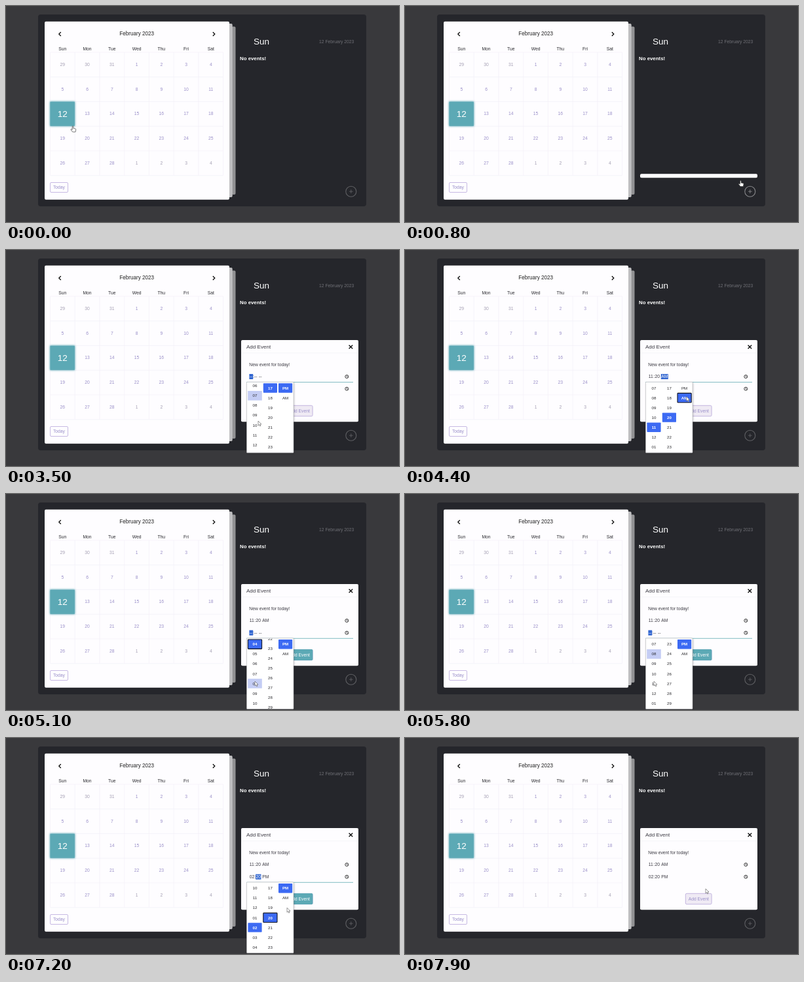
Write an HTML page that moves like this. It is 600 px wide and 331 px high and loops after 8 s.

```html
<!DOCTYPE html>
<html lang="en">
<head>
<meta charset="utf-8">
<title>Calendar: add event</title>
<style>
  html, body { margin: 0; width: 100%; height: 100%; overflow: hidden; background: #39393c; }
  svg { display: block; width: 100%; height: 100%; }
  text { font-family: "Liberation Sans", Arial, sans-serif; white-space: pre; }
</style>
</head>
<body>
<svg viewBox="0 0 600 331" preserveAspectRatio="none">
  <defs>
    <filter id="glow" x="-20%" y="-20%" width="140%" height="140%"><feGaussianBlur stdDeviation="1.7"/></filter>
  </defs>
  <g id="base"></g>
  <g id="live"></g>
</svg>
<script>
const LOOP = 8000, STEP = 100;
const TEAL = '#5ca9b5', PURPLE = '#9a90c9', INK = '#3b3a42', BLUE = '#3c6af3';
const CELL = 37.75, ROW = 15.05, COLUMNS = [380, 403.4, 426.6];
const MESSAGE = 'New event for today!';

// Drawing helpers; text is placed by its vertical centre.
const text = (s, x, y, size, fill, anchor = 'middle', extra = '') =>
  `<text x="${x}" y="${y + size * 0.35}" font-size="${size}" fill="${fill}" text-anchor="${anchor}" ${extra}>${s}</text>`;
const rect = (x, y, w, h, fill, r = 0, extra = '') =>
  `<rect x="${x}" y="${y}" width="${w}" height="${h}" rx="${r}" fill="${fill}" ${extra}/>`;
const path = (d, stroke, width, fill = 'none') =>
  `<path d="${d}" stroke="${stroke}" stroke-width="${width}" fill="${fill}" stroke-linejoin="round"/>`;

// Progress from 0 to 1 between two times.
const ramp = (t, from, to) => Math.min(1, Math.max(0, (t - from) / (to - from)));
const ease = (t, from, to) => { const p = ramp(t, from, to); return p * p * (3 - 2 * p); };

// Scroll gives each column's first item; picks are clicks: [time, column, item].
const PICKERS = [
  { open: 3100, close: 4600, top: 202.3, fieldY: 194,
    scroll: t => [4 + 3 * ease(t, 3300, 3600), 17, 0],
    picks: [[3700, 0, 11], [4100, 1, 20], [4300, 2, 1]] },
  { open: 4900, close: 7300, top: 221, fieldY: 212.7,
    scroll: t => [4 + 6 * ease(t, 5500, 6100), 17 + 6 * (ease(t, 4900, 5140) - ease(t, 6600, 6900)), 0],
    picks: [[6200, 0, 14], [7000, 1, 20]] }
];
const NAMES = [n => pad((n - 1) % 12 + 1), pad, n => ['PM', 'AM'][n]];
function pad(n) { return String(n).padStart(2, '0'); }

const rowY = (p, item, offset) => p.top + 9.2 + (item - offset) * ROW;
const pickStop = p => ([time, col, item]) =>
  [time - 100, COLUMNS[col] + 3, rowY(p, item, p.scroll(time)[col]) - 2];

// Pointer stops: [arrival time, x, y].
const STOPS = [
  [0, 102, 184], [600, 526, 281], [1200, 418, 175],
  [3000, 519, 194], [3400, 385, 262], [4600, 455, 245],
  [4800, 519, 212], [5100, 380, 287], [6600, 406, 274],
  [7300, 455, 245], [7900, 459, 231],
  ...PICKERS.flatMap(p => p.picks.map(pickStop(p)))
].sort((a, b) => a[0] - b[0]);

// Each move ends at its stop and lasts in proportion to its length.
function pointerAt(t) {
  const i = STOPS.findIndex(([time]) => time > t);
  if (i < 0) return STOPS[STOPS.length - 1].slice(1);
  const [t0, x0, y0] = STOPS[i - 1], [t1, x1, y1] = STOPS[i];
  const duration = 3.4 * Math.hypot(x1 - x0, y1 - y0);
  const e = ease(t, Math.max(t0, t1 - duration), t1);
  return [x0 + (x1 - x0) * e, y0 + (y1 - y0) * e];
}

function drawBase() {
  let s = rect(49, 13, 501, 294, '#25262b', 4)
    + rect(344, 31.5, 6.5, 257.5, '#929294', 2)
    + rect(339, 27, 6.7, 266, '#bfbfc1', 2)
    + rect(59, 23.7, 282, 273, '#fefdff', 2)
    + path('M83.8 40l-3 3 3 3M315.8 40l3 3-3 3', '#111', 1.3)
    + text('February 2023', 199.7, 42, 8.15, '#222');
  let grid = '';
  for (let c = 0; c <= 7; c++) grid += `M${67.4 + c * CELL} 71v188.5`;
  for (let r = 0; r <= 5; r++) grid += `M67.4 ${71 + r * CELL}h${7 * CELL}`;
  s += path(grid, '#f3f0f8', 0.7);
  ['Sun', 'Mon', 'Tue', 'Wed', 'Thu', 'Fri', 'Sat'].forEach((name, c) => {
    s += text(name, 86.3 + c * CELL, 65.6, 6.75, '#2b2b30');
  });
  for (let i = 0; i < 35; i++) {
    const x = 86.3 + i % 7 * CELL, y = 89.6 + Math.floor(i / 7) * CELL;
    const date = new Date(2023, 0, 29 + i), day = date.getDate();
    const current = date.getMonth() === 1;
    if (current && day === 12) {
      s += rect(67, 146.3, 38.3, 38, TEAL, 1, 'filter="url(#glow)"')
        + rect(67.5, 146.8, 37.3, 37, TEAL)
        + text(day, x, y - 0.3, 13.5, '#fff');
    } else {
      s += text(day, x, y, 6.75, current ? PURPLE : '#a49fb3');
    }
  }
  return s + rect(67.5, 270.5, 27, 15, '#fefdff', 1.5, 'stroke="#b9a9dc" stroke-width=".8"')
    + text('Today', 81, 277.8, 6.75, PURPLE)
    + text('Sun', 378, 54.4, 13.5, '#fff', 'start')
    + text('12 February 2023', 531.3, 54.4, 6.75, '#6f7076', 'end')
    + text('No events!', 357, 80.5, 7.85, '#fff', 'start', 'font-weight="bold"');
}

// Chosen items and active column after the clicks made so far.
function selection(p, t) {
  const chosen = [4, 17, 0], done = p.picks.filter(([time]) => time <= t);
  done.forEach(([, col, item]) => { chosen[col] = item; });
  return { chosen, blank: !done.length, active: done.length ? done[done.length - 1][1] : 0 };
}

function drawTime(p, y, t, focused) {
  const { chosen, blank, active } = selection(p, t);
  let s = text(':', blank ? 377.1 : 379.4, y, 6.75, INK, 'start');
  chosen.forEach((item, i) => {
    const x = 371.8 + i * (blank ? 7.1 : 9.7), on = focused && i === active;
    const width = blank ? 5 : i === 2 ? 10.2 : 7.5;
    if (on) s += rect(x - 0.4, y - 4, width + 0.8, 8, '#3367d1');
    s += text(blank ? '--' : NAMES[i](item), x, y, 6.75, on ? '#fff' : INK, 'start');
  });
  return s + `<circle cx="520.3" cy="${y}" r="2.5" fill="none" stroke="#222" stroke-width=".9"/>`
    + path(`M520.3 ${y - 1.6}v1.8l1.3 .7`, '#222', 0.7);
}

function drawForm(t) {
  const height = 125.3 * ramp(t, 790, 1000);
  if (!height) return '';
  const top = 263.3 - height, at = y => top + y - 138;
  const naming = t >= 1400 && t < 3000;
  const focused = PICKERS.find(p => t >= p.open - 100 && t < p.close);
  const half = MESSAGE.length / 2;
  const count = Math.floor(half * ramp(t, 1400, 1900)) + Math.floor(half * ramp(t, 2000, 2600));
  const hover = ramp(t, 4500, 4600) - ramp(t, 7400, 7700);
  const name = MESSAGE.slice(0, count) + (naming ? '|' : '');
  const underline = (y, color) => path(`M367 ${at(y)}h163`, color, 0.9);
  const s = text('Add Event', 367, at(148), 8.05, INK, 'start')
    + path(`M523.6 ${at(145.7)}l5.6 5.6m0-5.6l-5.6 5.6`, '#111', 1.4)
    + path(`M359 ${at(157.8)}h179`, '#f3f2f5', 0.7)
    + text(name || 'Event Name', 371.3, at(175.3), 6.75, name ? INK : '#a5a5a5', 'start')
    + PICKERS.map(p => drawTime(p, at(p.fieldY), t, p === focused)).join('')
    + (naming ? underline(184.2, '#93929f') : '')
    + (focused ? underline(focused.fieldY + 8.6, '#72b5bb') : '')
    + rect(428.3, at(238.3), 39.8, 16.4, '#efeaf4', 1.8, 'stroke="#b7a6da" stroke-width=".8"')
    + rect(428, at(238), 40.4, 17, TEAL, 1.8, `opacity="${hover}"`)
    + text('Add Event', 448.3, at(246.4), 6.75, hover ? '#fff' : PURPLE);
  return `<clipPath id="formClip">${rect(359, top, 179, height, '#000', 2)}</clipPath>`
    + rect(359, top, 179, height, '#fefdff', 2) + `<g clip-path="url(#formClip)">${s}</g>`;
}

function drawPicker(p, t) {
  if (t < p.open || t >= p.close) return '';
  const { chosen, active, blank } = selection(p, t);
  const [px, py] = pointerAt(t), offsets = p.scroll(t), settled = p.scroll(t - 300);
  let s = '';
  COLUMNS.forEach((x, col) => {
    const offset = offsets[col];
    const first = col === 2 ? 0 : Math.floor(offset) - 1, last = col === 2 ? 1 : first + 9;
    // The highlight keeps its item until scrolling has settled.
    const hovered = Math.abs(px - x) < 11 && py > p.top
      ? Math.round((py - p.top - 9.2) / ROW + settled[col]) : -1;
    for (let item = first; item <= last; item++) {
      const y = rowY(p, item, offset), on = item === chosen[col];
      const ring = on && col === active ? 'stroke="#10131f" stroke-width="1.1"' : '';
      if (on) s += rect(x - 10.6, y - 7.2, 21.2, 14.4, BLUE, 0.8, ring);
      else if (item === hovered) s += rect(x - 10.8, y - 7.3, 21.6, 14.6, '#c4cdf4');
      s += text(NAMES[col](item), x, y, 6.2, on ? '#fff' : '#28282c', 'middle', on ? 'font-weight="bold"' : '');
    }
  });
  return `<clipPath id="pickClip">${rect(367.7, p.top + 0.4, 71, 107.8, '#000')}</clipPath>`
    + rect(368, p.top + 1, 72, 109, '#000', 1, 'opacity=".22" filter="url(#glow)"')
    + rect(367.5, p.top, 71.5, 108.5, '#fff', 0.8, 'stroke="#b9b9bd" stroke-width=".6"')
    + `<g clip-path="url(#pickClip)">${s}</g>`;
}

function drawPointer(t) {
  const [x, y] = pointerAt(t);
  const inside = (x0, y0, x1, y1) => x >= x0 && x <= x1 && y >= y0 && y <= y1;
  const clickable = inside(67, 71, 332, 260) || inside(428, 238, 468, 255) || inside(508, 260, 536, 293);
  let shape = path('M0 0v7l1.6-1.5 1.1 2.4 1.2-.5-1.1-2.4h2.2z', '#555', 0.6, '#fff');
  if (clickable) {
    shape = path('M-.8 .4q.8-1 1.6 0v3l3 .6q1.1 .4 .9 1.6l-.7 3.4h-4.3l-2.6-3.4q-.2-1.2 1-.9l1.1 .9z', '#333', 0.65, '#fff');
  } else if (inside(367, 166, 530, 184)) {
    shape = path('M-1.5 -3.6q1.5 0 1.5 .8v5.6q0 .8-1.5 .8M1.5 -3.6q-1.5 0-1.5 .8M0 2.8q0 .8 1.5 .8', '#333', 0.8);
  }
  return `<g transform="translate(${x} ${y})">${shape}</g>`;
}

function drawPlus(t) {
  const opacity = 0.26 + 0.25 * (ramp(t, 400, 600) - ramp(t, 700, 1100));
  return `<g opacity="${opacity}"><circle cx="526.8" cy="284.2" r="8" fill="none" stroke="#fff" stroke-width="1.1"/>`
    + path('M524 284.2h5.6m-2.8-2.8v5.6', '#fff', 0.9) + '</g>';
}

const drawLive = t => drawPlus(t) + drawForm(t)
  + PICKERS.map(p => drawPicker(p, t)).join('') + drawPointer(t);

document.getElementById('base').innerHTML = drawBase();
const live = document.getElementById('live');
const start = performance.now();
let shown = -1;
function tick() {
  const elapsed = Math.max(0, performance.now() - start) % LOOP;
  const t = Math.floor(elapsed / STEP) * STEP;
  if (t !== shown) live.innerHTML = drawLive(shown = t);
  requestAnimationFrame(tick);
}
tick();
</script>
</body>
</html>
```
